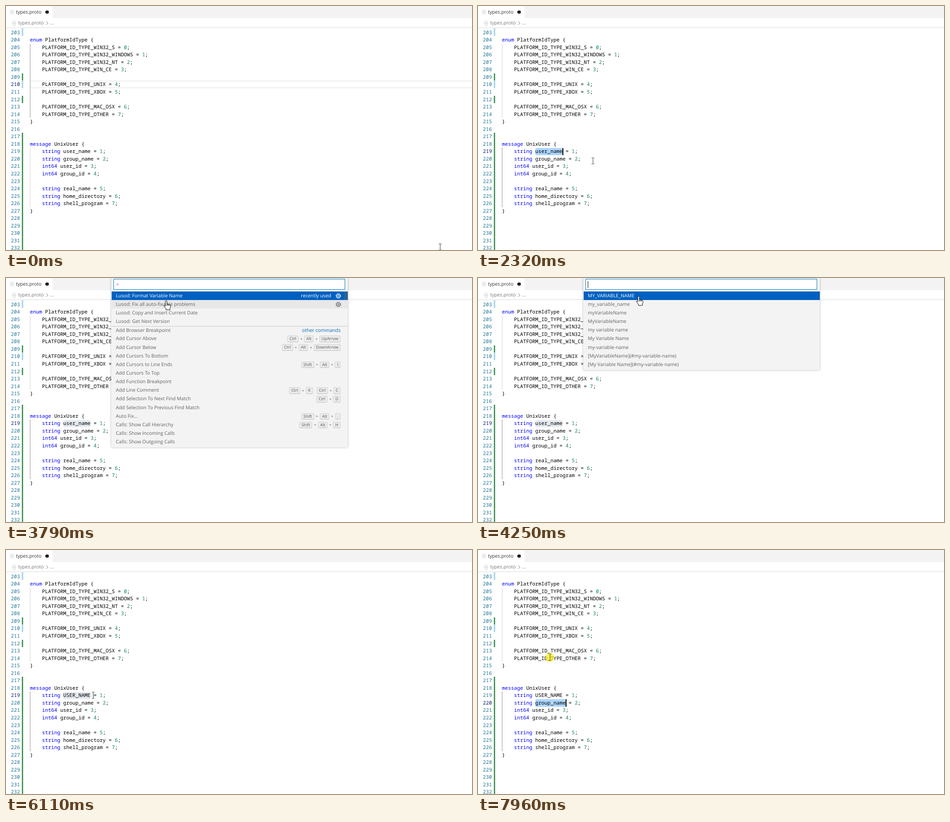
An HTML page that plays this animation: 1032x543 px, repeating every 8 s.

```html
<!DOCTYPE html>
<html lang="en">
<head>
<meta charset="utf-8">
<title>Format variable name</title>
<style>
html, body { margin: 0; width: 100%; height: 100%; overflow: hidden; background: #fff; }
#stage {
  --row: 19.17px; --line: 16.555px;
  position: relative; width: 1032px; height: 543px; overflow: hidden; background: #fff;
  font: 10.7px "Open Sans", "Noto Sans", sans-serif; text-rendering: geometricPrecision; color: #616161;
}
#stage > *, .abs { position: absolute; }
.tabs { left: 103px; right: 0; top: 0; height: 27px; background: #f3f3f3; }
.label { line-height: 16px; white-space: pre; font-size: 10.6px; }
.lines { width: 8px; height: 9px; background: repeating-linear-gradient(#ccc 0 1px, transparent 1px 2.7px); }
.dot { left: 87px; top: 9.5px; width: 7.5px; height: 7.5px; border-radius: 50%; background: #222; }
.edge { left: 0; right: 0; top: 47px; height: 3px; background: linear-gradient(#e4e4e4, #fff); }
.code {
  margin: 0; top: 51.6px; line-height: var(--line); white-space: pre; color: #000;
  font-family: "Noto Sans Mono", "DejaVu Sans Mono", monospace; font-size: 11.2px;
}
.code div { height: var(--line); }
#nums { left: 0; width: 31px; text-align: right; color: #237893; }
#nums .on { color: #0b216f; }
#text { left: 53px; }
.kw { color: #00f; }
.num { color: #098658; }
.bar { left: 35px; width: 2.5px; background: #48985d; }
.bar.mod { width: 3px; background: repeating-linear-gradient(-45deg, #53a9dc 0 1.2px, #fff 1.2px 2.8px); }
.guide { left: 53px; width: 1px; background: #d3d3d3; }
.guide.on { background: #939393; }
#current { left: 53px; right: -3px; height: 13px; border: 2px solid #eee; border-left: 0; }
#sel { height: 16.5px; left: 127px; border-radius: 3px; }
#caret { width: 1.6px; height: 16.5px; background: #000; }
#panel { left: 233px; top: 0; width: 524px; background: #f3f3f3; box-shadow: 0 0 4px rgba(0,0,0,.3); }
#input {
  left: 5px; top: 2px; width: 506px; height: 22px; line-height: 24px; padding-left: 5px;
  background: #fff; border: 1px solid #fff;
}
#input.on { border-color: #0078c0; }
#blink { top: 7px; width: 1px; height: 15px; background: #000; }
.list { left: 1px; right: 0; top: 30px; }
.row {
  display: flex; align-items: center; height: var(--row); line-height: var(--row);
  padding: 0 16px 0 9.3px; white-space: pre; box-sizing: border-box;
}
.row > span { position: relative; top: .6px; }
.row span:first-child { flex: 1; }
.row.sep { border-top: 1px solid #c8c8c8; }
.row.hover { background: #e8e8e8; }
.row.pick { background: #0060c0; color: #fff; }
.note { color: #006ab1; }
.pick .note { color: #fff; }
.row .keys { font-size: 9px; display: flex; align-items: center; top: 0; }
.keys b {
  font-weight: 400; line-height: 12.5px; padding: 0 4px; border: 1px solid #d2d2d2;
  border-bottom-color: #bbb; border-radius: 3px; background: #ebebeb; color: #555;
}
.keys i { font-style: normal; width: 12.4px; text-align: center; }
.keys u { width: 8.5px; }
.gear { display: none; width: 12px; height: 12px; margin: 0 -1px 0 10px; }
.hover .gear, .pick .gear { display: block; }
#slider { right: 0; top: 30px; width: 9px; height: 19px; background: rgba(100,100,100,.4); }
#ring { width: 20px; height: 20px; margin: -10px; border-radius: 50%; background: rgba(255,240,0,.65); }
#mouse { left: 0; top: 0; overflow: visible; }
</style>
</head>
<body>
<div id="stage">
  <div class="tabs"></div>
  <div class="lines" style="left:9px;top:9px"></div>
  <div class="label" style="left:22px;top:5.6px;color:#333">types.proto</div>
  <div class="dot"></div>
  <div class="lines" style="left:14px;top:34px"></div>
  <div class="label" style="left:27px;top:30px;color:#767676">types.proto</div>
  <svg style="left:88px;top:33px" width="7" height="10" fill="none" stroke="#767676"><path d="M1 1L5 5L1 9"/></svg>
  <div class="label" style="left:98px;top:30px;color:#767676">...</div>
  <div class="edge"></div>
  <div id="current"></div>
  <div id="sel"></div>
  <div class="guide" id="guideA" style="top:84px;height:165px"></div>
  <div class="guide" id="guideB" style="top:315px;height:133px"></div>
  <div class="bar mod" style="top:49px;height:18px"></div>
  <div class="bar" style="top:150px;height:16px"></div>
  <div class="bar mod" style="top:167px;height:16px"></div>
  <div class="bar" style="top:200px;height:16px"></div>
  <div class="bar" style="top:282px;height:261px"></div>
  <div class="code" id="nums"></div>
  <div class="code" id="text"></div>
  <div id="caret"></div>
  <div id="panel">
    <div class="abs" id="input"></div>
    <div class="abs" id="blink"></div>
    <div class="abs list" id="commands"></div>
    <div class="abs list" id="styles"></div>
    <div class="abs" id="slider"></div>
  </div>
  <div id="ring"></div>
  <svg id="mouse" width="1" height="1">
    <path id="beam" d="M-2.5 -7H-.5L.5 -6L1.5 -7H3.5M.5 -6V6M-2.5 7H-.5L.5 6L1.5 7H3.5" fill="none" stroke="#333"/>
    <g id="hand" fill="#fff" stroke="#000">
      <path d="M-2 1.5Q-2 -.5 -.3 -.5T1.4 1.5V7L4 7.6Q7 8 8.6 9.4Q9.5 10.2 9.4 12.5Q9.2 15 8 17V20H-.5V18L-4.5 12.6Q-5.6 10.8 -4.6 10.2T-2 12Z"/>
      <path d="M1.4 7V11M4 8V11M6.6 8.8V11" fill="none"/>
    </g>
  </svg>
</div>
<script>
const $ = id => document.getElementById(id);
const FIRST = 203, LINE = 16.555, CHAR = 6.72, ROW = 19.17, LOOP = 8000;
const lineTop = n => 50.7 + (n - FIRST) * LINE;

const source = `
enum PlatformIdType {
    PLATFORM_ID_TYPE_WIN32_S = 0;
    PLATFORM_ID_TYPE_WIN32_WINDOWS = 1;
    PLATFORM_ID_TYPE_WIN32_NT = 2;
    PLATFORM_ID_TYPE_WIN_CE = 3;

    PLATFORM_ID_TYPE_UNIX = 4;
    PLATFORM_ID_TYPE_XBOX = 5;

    PLATFORM_ID_TYPE_MAC_OSX = 6;
    PLATFORM_ID_TYPE_OTHER = 7;
}


message UnixUser {
    string user_name = 1;
    string group_name = 2;
    int64 user_id = 3;
    int64 group_id = 4;

    string real_name = 5;
    string home_directory = 6;
    string shell_program = 7;
}




`.split("\n").slice(0, 30);

$("text").innerHTML = source.map(s => "<div>" + s
  .replace(/\b(\d)(?=;)/, '<span class="num">$1</span>')
  .replace(/^( *)(enum|message|string|int64)\b/, '$1<span class="kw">$2</span>')
  .replace("user_name", '<span id="field">user_name</span>') + "</div>").join("");
$("nums").innerHTML = source.map((_, i) => `<div>${FIRST + i}</div>`).join("");

// Each command: label | keys (chords split by a space) | note
const commands = `Lusod: Format Variable Name||recently used
Lusod: Fix all auto-fixable problems
Lusod: Copy and Insert Current Date
Lusod: Get Next Version
Add Browser Breakpoint||other commands
Add Cursor Above|Ctrl+Alt+UpArrow
Add Cursor Below|Ctrl+Alt+DownArrow
Add Cursors To Bottom
Add Cursors to Line Ends|Shift+Alt+I
Add Cursors To Top
Add Function Breakpoint
Add Line Comment|Ctrl+K Ctrl+C
Add Selection To Next Find Match|Ctrl+D
Add Selection To Previous Find Match
Auto Fix...|Shift+Alt+.
Calls: Show Call Hierarchy|Shift+Alt+H
Calls: Show Incoming Calls
Calls: Show Outgoing Calls`.split("\n");
const styles = ["MY_VARIABLE_NAME", "my_variable_name", "myVariableName", "MyVariableName", "my variable name",
  "My Variable Name", "my-variable-name", "[MyVariableName](#my-variable-name)", "[My Variable Name](#my-variable-name)"];

const gear = `<svg class="gear" viewBox="-6 -6 12 12" fill="none" stroke="currentColor">
  <circle r="5" stroke-width="1.8" stroke-dasharray="1.96 1.96"/><circle r="3.9"/><circle r="1.5"/></svg>`;
const chord = c => c.split("+").map(k => `<b>${k}</b>`).join("<i>+</i>");
const keys = k => k ? `<span class="keys">${k.split(" ").map(chord).join("<u></u>")}</span>` : "";
const row = (s, i) => {
  const [label, k, note] = s.split("|");
  return `<div class="row${i ? "" : " pick"}${note && i ? " sep" : ""}"><span>${label}</span>${keys(k)}` +
    (note ? `<span class="note">${note}</span>` : "") + gear + "</div>";
};
$("commands").innerHTML = commands.map(row).join("");
$("styles").innerHTML = styles.map(row).join("");
$("styles").querySelectorAll(".gear").forEach(g => g.remove());

// Pointer path: time, x, y
const path = [
  [0, 961, 536], [70, 961, 536], [400, 640, 405], [860, 316, 290], [1250, 205, 312], [1620, 150, 324],
  [1920, 150, 324], [2420, 266, 347], [2920, 266, 347], [3720, 356, 54], [3790, 355, 51], [3860, 356, 41],
  [5600, 356, 41], [5720, 373, 70], [5900, 300, 215], [6110, 193, 323], [6370, 169, 341],
  [7120, 169, 341], [7630, 159, 238.5], [8000, 159, 238.5]
];
const same = (a, b) => a[1] === b[1] && a[2] === b[2];

function slope(i, k) {
  const a = path[i - 1], p = path[i], b = path[i + 1];
  if (!a || !b || same(a, p) || same(p, b)) return 0;
  return (b[k] - a[k]) / (b[0] - a[0]);
}

function pointer(t) {
  let i = 0;
  while (i < path.length - 2 && t >= path[i + 1][0]) i++;
  const a = path[i], b = path[i + 1], d = b[0] - a[0], u = (t - a[0]) / d, v = 1 - u;
  return [1, 2].map(k =>
    a[k] * v * v * (1 + 2 * u) + b[k] * u * u * (3 - 2 * u) + d * u * v * (v * slope(i, k) - u * slope(i + 1, k)));
}

const show = (id, on) => { $(id).style.display = on ? "" : "none"; };
const within = (t, ...spans) => spans.some(([a, b]) => t >= a && t < b);
const blinkOn = (t, start) => Math.floor((t - start) / 530) % 2 === 0;

function draw(t) {
  const [x, y] = pointer(t);
  const active = t < 1720 ? 210 : t < 6510 ? 219 : 220;
  const selected = within(t, [1860, 6510], [6640, LOOP]);
  const open = within(t, [2920, 5440]);
  const naming = t >= 4120;

  [...$("nums").children].forEach((n, i) => n.classList.toggle("on", FIRST + i === active));
  $("guideA").classList.toggle("on", active === 210);
  $("guideB").classList.toggle("on", active !== 210);
  show("current", !selected);
  $("current").style.top = lineTop(active) - .7 + "px";
  $("field").textContent = t < 5440 ? "user_name" : "USER_NAME";

  const focused = within(t, [1720, 2920], [6510, LOOP]);
  const selWidth = (active === 219 ? 9 : 10) * CHAR;
  show("sel", selected);
  $("sel").style.top = $("caret").style.top = lineTop(active) + "px";
  $("sel").style.width = selWidth + "px";
  $("sel").style.background = focused ? "#add6ff" : "#e5ebf1";
  show("caret", focused && selected && blinkOn(t, active === 219 ? 1890 : 6640));
  $("caret").style.left = 127 + selWidth + "px";

  show("panel", open);
  if (open) {
    const list = naming ? "styles" : "commands";
    show("commands", !naming);
    show("styles", naming);
    show("slider", !naming && t >= 2990);
    const rows = [...$(list).children], hover = Math.floor((y - 30) / ROW);
    rows.forEach((r, i) => r.classList.toggle("hover", i > 0 && i === hover));
    $("panel").style.height = 32.3 + rows.length * ROW + "px";
    const typing = !within(t, [3890, 4120], [5310, 5440]);
    $("input").classList.toggle("on", typing);
    $("input").textContent = naming ? "" : ">";
    $("blink").style.left = naming ? "10px" : "17px";
    show("blink", typing && blinkOn(t, naming ? 4250 : 2920));
  }

  show("ring", within(t, [1640, 1790], [1860, 1920], [3890, 4060], [5310, 5440], [6370, 6510], [6640, 6770], [7960, LOOP]));
  $("ring").style.left = x + "px";
  $("ring").style.top = y + "px";
  const hand = within(t, [2920, 5640]);
  show("hand", hand);
  show("beam", !hand);
  $("mouse").style.transform = `translate(${x}px, ${y}px)`;
}

const start = performance.now();
function tick() {
  draw((performance.now() - start) % LOOP);
  requestAnimationFrame(tick);
}
tick();
</script>
</body>
</html>
```
